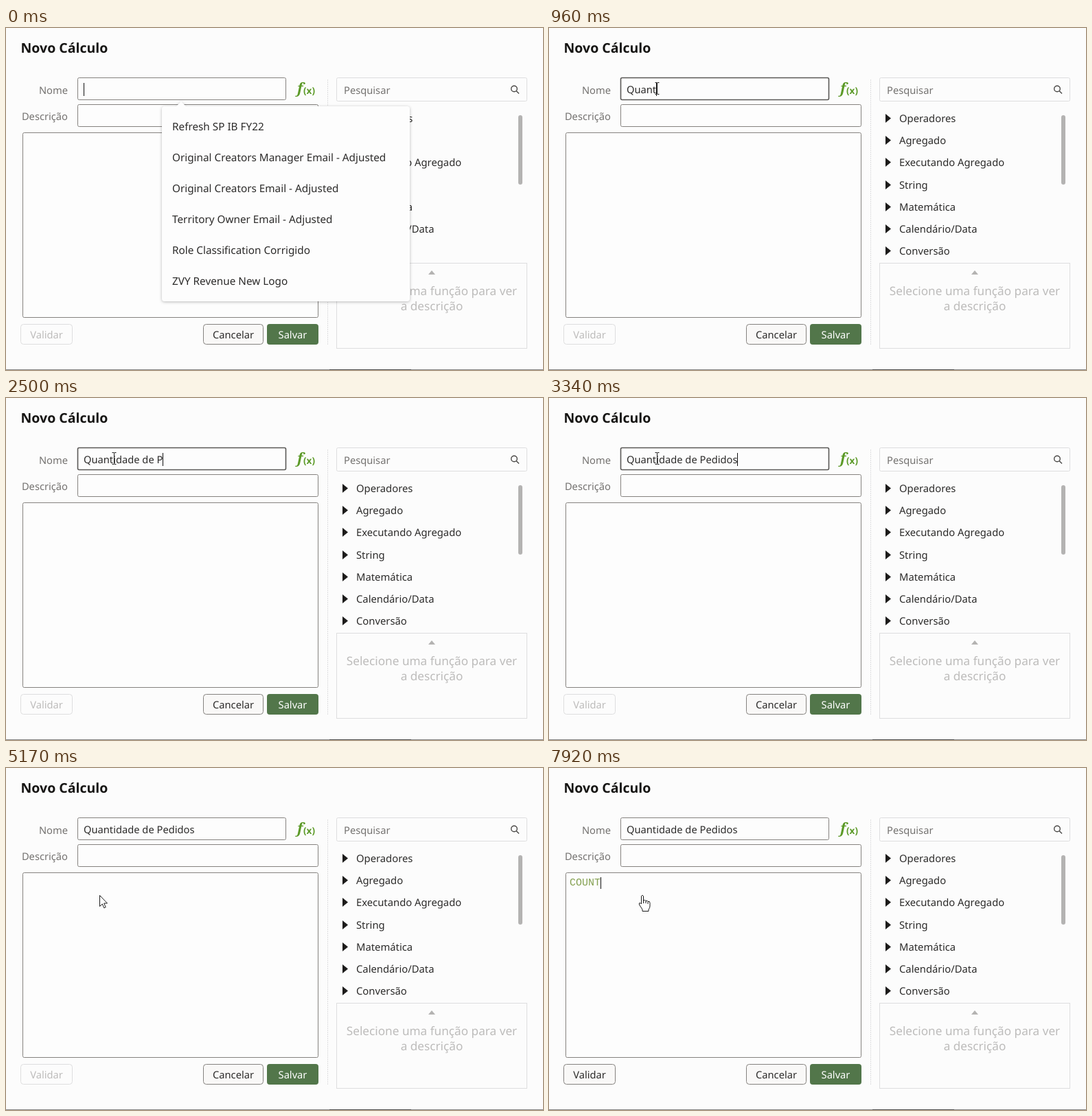
An HTML page for the animation above (8 s loop, 782 by 498 pixels).

```html
<!DOCTYPE html>
<html lang="pt">
<head>
<meta charset="utf-8">
<style>
  html, body { margin: 0; width: 100%; height: 100%; overflow: hidden; background: #fcfcfc; }
  svg { display: block; }
  text { font: 14.7px "Noto Sans", sans-serif; fill: #2c2b2a; white-space: pre; text-rendering: geometricPrecision; }
  .title { font-size: 19.5px; font-weight: 800; fill: #161513; }
  .label { fill: #747270; }
  .right { text-anchor: end; }
  .middle { text-anchor: middle; }
  .help { font-size: 17.2px; fill: #bdbcbb; text-anchor: middle; }
  .tree { font-size: 14.8px; }
  .option { font-size: 15.3px; }
  .code { font: 15px "Liberation Mono", monospace; fill: #84a050; }
  .box { fill: #fdfdfd; stroke: #85827f; }
  .soft { fill: none; stroke: #dededf; }
  .button { fill: #f9f8f7; stroke: #85827f; }
  .off { fill: #fcfcfc; stroke: #dededf; }
  text.off { fill: #bdbcbb; stroke: none; }
  .focus { stroke: #5a5856; stroke-width: 1.6; }
  .pointer { fill: #fff; stroke: #1c1c1c; stroke-linejoin: round; }
  #popup { filter: drop-shadow(0 1px 2px #0004); }
</style>
</head>
<body>
<svg width="782" height="498" viewBox="0 0 782 498">
  <text class="title" x="21.5" y="36">Novo Cálculo</text>
  <text class="label right" x="90" y="96">Nome</text>
  <text class="label right" x="90" y="134">Descrição</text>
  <rect id="nameBox" class="box" x="104.5" y="72.5" width="303" height="32" rx="2"/>
  <rect class="box" x="104.5" y="111.5" width="350" height="32" rx="2"/>
  <rect class="box" x="24.5" y="152.5" width="430" height="269" rx="2"/>
  <text x="424" y="95" style="font:italic bold 21px 'Noto Serif',serif;fill:#5c9a28">f</text>
  <text x="433" y="96" style="font-size:13.5px;font-weight:900;fill:#5c9a28">(x)</text>
  <text id="name" x="113" y="95"></text>
  <text id="code" class="code" x="30" y="171"></text>

  <path class="soft" d="M468.5 75V461" stroke-dasharray="2 1"/>
  <rect class="soft" x="481.5" y="72.5" width="277" height="34" rx="2"/>
  <text class="label" x="492" y="96">Pesquisar</text>
  <g fill="none" stroke="#4a4846" stroke-width="1.4"><circle cx="740" cy="88.5" r="4.3"/><path d="M743 91.5l4 4"/></g>
  <g id="tree"></g>
  <rect x="746" y="127" width="6" height="101" rx="3" fill="#b4b3b2"/>
  <rect class="soft" x="481.5" y="342.5" width="277" height="124"/>
  <path d="M615 359l5-6 5 6z" fill="#b4b3b2"/>
  <text class="help" x="620" y="389">Selecione uma função para ver</text>
  <text class="help" x="620" y="411">a descrição</text>

  <rect id="checkBox" class="button" x="21.5" y="431.5" width="75" height="29" rx="4"/>
  <text id="check" class="middle" x="59" y="452">Validar</text>
  <rect class="button" x="287.5" y="431.5" width="87" height="29" rx="4"/>
  <text class="middle" x="331" y="452">Cancelar</text>
  <rect x="380" y="431" width="75" height="30" rx="4" fill="#52764a"/>
  <text class="middle" x="417.5" y="452" style="fill:#fff;font-weight:500">Salvar</text>
  <path d="M0 497.5H782" stroke="#858585"/>
  <path d="M471 497.5H590" stroke="#4c4c4c"/>

  <g id="popup">
    <rect id="popupBox" x="227" y="114" rx="4" fill="#fdfdfd"/>
    <path d="M247 115l8-8 8 8z" fill="#fdfdfd"/>
    <g id="options"></g>
  </g>
  <rect id="caret" width="1" fill="#111"/>
  <g id="mouse">
    <path id="beam" d="M-3-8.5h2.5l.5.5.5-.5h2.5M0-8V8M-3 8.5h2.5l.5-.5.5.5h2.5" fill="none" stroke="#222"/>
    <path id="arrow" class="pointer" d="M.5.5V16.5L4.3 13 6.8 18.8 9.2 17.7 6.7 12H11.5z"/>
    <path id="hand" class="pointer" d="M-1.500 1.500Q0-1 1.500 1.500V8Q4 6.500 5 8.500 7.500 7.500 8 9.500 11 8.500 11 11.500V16Q11 19 9 21V23.500H0V21L-4.500 14Q-5.500 11-3 11.500L-1.500 13zM5 9v3M8 10v3M1.500 8v4"/>
  </g>
</svg>
<script>
const LOOP = 8000, CLICK = 4500, CODE_START = 6790;
const NAME = 'Quantidade de Pedidos', CODE = 'COUNT';
const SUGGESTIONS = [
  'Refresh SP IB FY22', 'Original Creators Manager Email - Adjusted',
  'Original Creators Email - Adjusted', 'Territory Owner Email - Adjusted',
  'Role Classification Corrigido', 'ZVY Revenue New Logo'
];
const MATCHES = ['Quarter Cumulative Week % Target'];

// Rows of [time, value], joined by straight lines
const TYPING = [[0, 0], [250, 1], [600, 3], [800, 4], [1520, 10], [2400, 15], [3260, 21]];
const MOUSE_X = [[3380, 157], [3900, 153], [4170, 152], [4420, 152], [4540, 136]];
const MOUSE_Y = [[3380, 88], [3900, 191], [4170, 191], [4210, 185]];

const $ = id => document.getElementById(id);
const show = (id, on) => $(id).style.display = on ? '' : 'none';
const attrs = (id, values) => {
  for (const key in values) $(id).setAttribute(key, values[key]);
};

function valueAt(t, keys) {
  const next = keys.findIndex(key => key[0] > t);
  if (next < 0) return keys[keys.length - 1][1];
  if (next === 0) return keys[0][1];
  const [t0, a] = keys[next - 1], [t1, b] = keys[next];
  return a + (b - a) * (t - t0) / (t1 - t0);
}

$('tree').innerHTML = ['Operadores', 'Agregado', 'Executando Agregado', 'String',
  'Matemática', 'Calendário/Data', 'Conversão'].map((label, i) => {
    const y = Math.round(137 + i * 32.2);
    return `<path d="M490 ${y - 12}l8 6.5-8 6.5z" fill="#1c1b1a"/>
      <text class="tree" x="510" y="${y}">${label}</text>`;
  }).join('');

let shownList;
function setPopup(list) {
  if (list === shownList) return;
  shownList = list;
  show('popup', list);
  if (!list) return;
  attrs('popupBox', { width: list === MATCHES ? 301 : 361, height: 14 + 45 * list.length });
  $('options').innerHTML = list.map((label, i) =>
    `<text class="option" x="242" y="${149 + 45 * i}">${label}</text>`).join('');
}

function draw(t) {
  const typed = Math.floor(valueAt(t, TYPING) + 1e-6);
  const coded = t < CODE_START ? 0 : Math.min(CODE.length, 1 + Math.floor((t - CODE_START) / 75));
  const inCode = t >= CLICK;
  $('name').textContent = NAME.slice(0, typed);
  $('code').textContent = CODE.slice(0, coded);
  setPopup(typed === 0 ? SUGGESTIONS : typed < 4 ? MATCHES : null);

  $('nameBox').classList.toggle('focus', t >= 40 && !inCode);
  $('check').classList.toggle('off', !coded);
  $('checkBox').classList.toggle('off', !coded);

  const idle = inCode ? t - CLICK : Math.max(0, t - 3260);
  show('caret', coded || idle % 1000 < 500);
  const text = $(inCode ? 'code' : 'name');
  attrs('caret', {
    x: Math.round((inCode ? 30 : 113) + (text.textContent ? text.getComputedTextLength() : 0)),
    y: inCode ? 159 : 80,
    height: inCode ? 17 : 19
  });

  const x = valueAt(t, MOUSE_X), y = valueAt(t, MOUSE_Y);
  const overInput = y < 105 || (y > 111 && y < 144);
  const overLink = t >= 7500;
  show('mouse', t >= 300);
  show('beam', overInput);
  show('arrow', !overInput && !overLink);
  show('hand', overLink);
  attrs('mouse', { transform: `translate(${Math.round(x) + (overInput ? .5 : 0)} ${Math.round(y)})` });
}

function tick() {
  draw(performance.now() % LOOP);
  requestAnimationFrame(tick);
}
tick();
</script>
</body>
</html>
```
